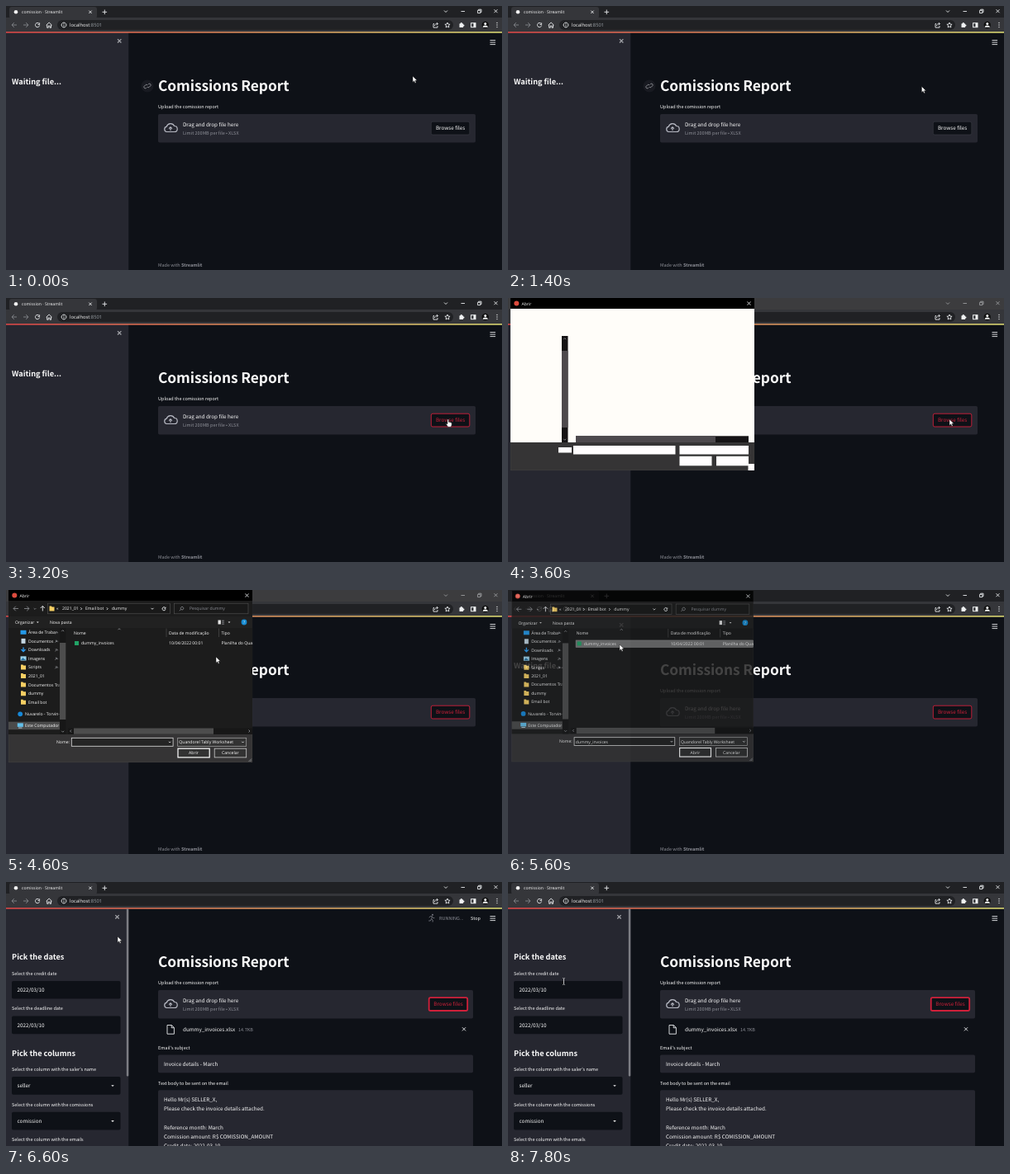
Animation of 600x320 px, one loop 8000 ms. Source, as an HTML page:

```html
<!DOCTYPE html>
<html lang="en">
<head>
<meta charset="utf-8">
<title>Comissions Report</title>
<style>
  html, body { margin: 0; width: 100%; height: 100%; overflow: hidden; background: #0e1117; }
  svg { display: block; width: 100vw; height: 100vh; }
  text { white-space: pre; text-rendering: geometricPrecision; fill: #fafafa;
    font: 6.33px "Noto Sans CJK JP", "Noto Sans CJK SC", "Noto Sans", sans-serif; }
  text.small { font-size: 5.52px; }
  text.dim { fill: #8d8f97; }
  text.head { font-size: 9.2px; font-weight: 700; }
  text.title { font-size: 17.35px; font-weight: 700; letter-spacing: -.08px; }
  text.ui { font: 5.1px "Open Sans", "Noto Sans", sans-serif; }
  text.mid { text-anchor: middle; }
  .line { fill: none; stroke: #e8eaed; stroke-width: .9; }
  .gray { stroke: #85878c; }
</style>
</head>
<body>
<svg id="stage" viewBox="0 0 600 320"></svg>
<script>
const text = (x, y, s, cls = '') => `<text x="${x}" y="${y}" class="${cls}">${s}</text>`;
const ui = (x, y, s, cls = '') => text(x, y, s, 'ui ' + cls);
const rect = (x, y, w, h, fill, more = '') =>
  `<rect x="${x}" y="${y}" width="${w}" height="${h}" fill="${fill}" ${more}/>`;
const dot = (x, y, r, fill) => `<circle cx="${x}" cy="${y}" r="${r}" fill="${fill}"/>`;
const line = (d, cls = '', more = '') => `<path class="line ${cls}" d="${d}" ${more}/>`;
const group = (id, ...parts) => `<g id="${id}">${parts.join('')}</g>`;
const cross = (x, y, r, cls, more) =>
  line(`M${x - r} ${y - r}l${2 * r} ${2 * r}m0 ${-2 * r}l${-2 * r} ${2 * r}`, cls, more);
const chevron = (x, y, r = 1.5, cls = '') => line(`M${x - r} ${y - r / 2}l${r} ${r}l${r} ${-r}`, cls);
const chevronUp = (x, y) => line(`M${x - 1.5} ${y + .7}l1.5 -1.5l1.5 1.5`, 'gray');
const chevronRight = (x, y) => line(`M${x - .7} ${y - 1.4}l1.4 1.4l-1.4 1.4`, '', 'stroke-width=".6"');
const triangle = (x, y, r = 1.8) => `<path d="M${x - r} ${y - r / 2}h${2 * r}l${-r} ${r}z" fill="#fafafa"/>`;
const arrowLeft = (x, y, cls) => line(`M${x + 3} ${y}h-6m2.8 -2.8l-2.8 2.8l2.8 2.8`, cls);
const arrowRight = (x, y, cls) => line(`M${x - 3} ${y}h6m-2.8 -2.8l2.8 2.8l-2.8 2.8`, cls);
const reload = (x, y, r) =>
  line(`M${x + r * .8} ${y - r * .6}A${r} ${r} 0 1 0 ${x + r} ${y + .5}M${x + r} ${y - r}v${r * .8}h${-r * .8}`);
const folder = (x, y) =>
  `<path d="M${x - 3} ${y - 3}h2.4l.8 1h2.8v5h-6z" fill="#f6cf63"/>`;
const square = (x, y, size, fill) => rect(x - size / 2, y - size / 2, size, size, fill);

const browser = [
  rect(0, 0, 600, 14, '#202124', 'id="strip"'),
  rect(4, 1, 106, 14, '#35363a', 'rx="3"'),
  rect(0, 14, 600, 18, '#35363a'),
  dot(12, 7.3, 2.3, '#f4f4f4'),
  ui(19, 9.3, 'comission · Streamlit'),
  cross(102, 7.3, 1.7),
  line('M116.5 7.3h5.6M119.3 4.5v5.6'),
  group('controls',
    chevron(532, 6.5, 2), line('M550.5 6.5h4.5'),
    line('M570.6 5.3h3.3v3.3h-3.3zM571.7 5.3v-1.1h3.3v3.3h-1.1', '', 'stroke-width=".7"'),
    cross(592.5, 6.2, 2)),
  arrowLeft(10, 23, 'gray'), arrowRight(24, 23, 'gray'), reload(38, 23, 2.6),
  line('M48.7 23.2l3.4 -3.2l3.4 3.2M49.7 22.7v3.6h1.5v-2.2h1.8v2.2h1.5v-3.6'),
  rect(62, 17, 479, 12, '#202124', 'rx="6"'),
  line('M70 20.1a2.9 2.9 0 1 0 .01 0M70 22.5v2M70 21.3v.7', '', 'stroke-width=".7"'),
  `<text x="77" y="25.1" class="ui" style="font-size:5.8px">localhost<tspan fill="#9aa0a6">:8501</tspan></text>`,
  line('M518 21.5h-1v4.6h5v-2M518.5 24c0 -2 1.5 -2.4 3.8 -2.4m-1.4 -1.6l1.6 1.6l-1.6 1.6', '', 'stroke-width=".7"'),
  line('M534 20l.9 2.1l2.2 .2l-1.7 1.5l.5 2.2l-1.9 -1.2l-1.9 1.2l.5 -2.2l-1.7 -1.5l2.2 -.2z', '', 'stroke-width=".7"'),
  rect(548.5, 21.3, 4.6, 4.6, '#f1f3f4', 'rx=".5"'), dot(550.8, 21, 1.1, '#f1f3f4'), dot(553.4, 23.6, 1.1, '#f1f3f4'),
  rect(562.6, 20.7, 5.4, 5, 'none', 'stroke="#f1f3f4"'), rect(565.5, 20.7, 2.5, 5, '#f1f3f4'),
  dot(579.8, 23, 4.2, '#111'), dot(579.8, 21.6, 1.5, '#f1f3f4'),
  '<path d="M576.8 25.8a3 2.4 0 0 1 6 0z" fill="#f1f3f4"/>',
  [20.4, 23, 25.6].map(y => dot(594, y, .7, '#f1f3f4')).join('')
];

const page = [
  rect(0, 32, 600, 288, '#0e1117'),
  rect(0, 32, 148.3, 288, '#262730'),
  rect(0, 31.3, 600, 1.3, 'url(#rainbow)'),
  line('M585.5 41.6h6.6m-6.6 2.5h6.6m-6.6 2.5h6.6'),
  group('closeSide', cross(137.2, 42.3, 2.2, '', 'style="stroke:#a5a6ab;stroke-width:1.2"')),
  group('link', dot(171, 97, 7.5, '#181a21'),
    line('M170.3 98.6l-1 1a1.6 1.6 0 0 1 -2.2 -2.2l1.6 -1.6a1.6 1.6 0 0 1 2.2 0M171.7 95.4l1 -1a1.6 1.6 0 0 1 2.2 2.2l-1.6 1.6a1.6 1.6 0 0 1 -2.2 0', '', 'style="stroke:#a5a6ab;stroke-width:.8"')),
  text(184, 103, 'Comissions Report', 'title'),
  text(184, 124, 'Upload the comission report', 'small'),
  rect(184, 131, 384, 34.5, '#262730', 'rx="1.8" id="drop"'),
  line('M194.5 152.5a3.2 3.2 0 0 1 -.2 -6.3a5 5 0 0 1 9.3 -.7a3.5 3.5 0 0 1 .2 7z', '', 'style="stroke:#b8bac4;stroke-width:1.2"'),
  line('M199 151v-4.2m-1.9 1.8l1.9 -1.9l1.9 1.9', '', 'style="stroke:#b8bac4;stroke-width:1.1"'),
  text(214, 145.8, 'Drag and drop file here'),
  text(214, 156.4, 'Limit 200MB per file • XLSX', 'small dim'),
  group('button', rect(514.3, 140.2, 46.5, 15.8, '#0e1117', 'rx="1.8" id="face"'),
    `<text x="537.6" y="150.2" class="mid" id="caption">Browse files</text>`)
];

const footer = `<text x="184" y="315.5" class="small dim">Made with <tspan font-weight="700">Streamlit</tspan></text>`;

const fileRow = [
  line('M195 173.5h5.4l3 3v7.7h-8.4zM200.2 173.6v3.1h3', '', 'stroke-width=".8"'),
  text(214, 180.8, 'dummy_invoices.xlsx'),
  text(281, 180.8, '14.7KB', 'small dim'),
  cross(554, 178.3, 2.1)
];

const sideField = (label, value, y, arrow) =>
  text(7, y, label, 'small') + rect(7, y + 7.3, 131.5, 21.7, '#0e1117', 'rx="1.8"') +
  text(13.5, y + 20.4, value) + (arrow ? triangle(129, y + 18.5) : '');

const form = [
  text(7, 94.4, 'Pick the dates', 'head'),
  sideField('Select the credit date', '2022/03/10', 112.6),
  sideField('Select the deadline date', '2022/03/10', 155.3),
  text(7, 210.6, 'Pick the columns', 'head'),
  sideField("Select the column with the saler's name", 'seller', 228.7, true),
  sideField('Select the column with the comissions', 'comission', 271.5, true),
  text(7, 314.4, 'Select the column with the emails', 'small'),
  rect(145.8, 32.5, 2.5, 203, '#7c7d83', 'rx="1"'),
  text(184, 203.2, "Email's subject", 'small'),
  rect(184, 209.5, 381, 21.8, '#262730', 'rx="1.8"'),
  text(191, 222.6, 'Invoice details - March'),
  text(184, 246.1, 'Text body to be sent on the email', 'small'),
  rect(184, 252.3, 381, 70, '#262730', 'rx="1.8"'),
  ['Hello Mr(s) SELLER_X,', 'Please check the invoice details attached.', '',
   'Reference month: March', 'Comission amount: R$ COMISSION_AMOUNT', 'Credit date: 2022-03-10']
    .map((s, i) => text(191, 265.6 + i * 11.3, s)).join('')
];

const running = [
  dot(516, 39.7, 1, '#777982'),
  line('M511.8 43.2l1.5 -1.7l2.3 .3l-1 3l1.6 1.3v2.4M514.3 45.2l-1 1.8h-2M515.6 42.2l1.2 1.4h1.5', '', 'style="stroke:#777982"'),
  text(524, 46, 'RUNNING...', 'small dim'),
  text(562, 46, 'Stop', 'small')
];

const treeItems = ['Área de Traba', 'Documentos', 'Downloads', 'Imagens', 'Scripts',
  '2021_01', 'Documentos Tra', 'dummy', 'Email bot'];
const tree = treeItems.map((name, i) => {
  const y = 51.3 + i * 10.55;
  const icon = [
    rect(17.5, y - 2.5, 7, 5, '#2499e8'),
    rect(18.5, y - 3, 5, 6, '#c3d6e2'),
    line(`M21 ${y - 3}v5m-2.5 -2.4l2.5 2.5l2.5 -2.5`, '', 'style="stroke:#2a9df4;stroke-width:1.3"'),
    rect(17.5, y - 2.6, 7, 5.2, '#9ed4ed') + `<path d="M18 ${y + 2}l2.3 -3l3.7 3z" fill="#2872a0"/>`
  ][i] || folder(21, y);
  const pin = i < 5 ? line(`M59.4 ${y + 1.8}l1.6 -1.6m-1 -1l2 2m-1.2 -2.5l2 2`, 'gray') : '';
  return icon + ui(27, y + 1.9, name) + pin;
}).join('');

const skeleton = [
  rect(3, 13, 295, 162, '#fffdf9'),
  rect(65, 46, 7.5, 129, '#151315'), rect(65, 64, 7.5, 93, '#4d494d'),
  chevronUp(68.7, 49.5), chevron(68.7, 171.5, 1.5, 'gray'),
  rect(82, 167.3, 209, 7.7, '#151315'), rect(82, 167.3, 169, 7.7, '#4d494d'),
  [[61, 181, 16, 6.5], [79, 179, 123.5, 10.5], [207.5, 179, 83.5, 10.5],
   [207.5, 191.8, 39, 11.5], [252, 191.8, 39, 11.5], [290.5, 201, 7.5, 8]]
    .map(box => rect(...box, '#fffdfe')).join('')
];

const listing = [
  rect(3, 13, 295, 162, '#1c1c1c'),
  rect(3, 32, 295, 14, '#212121'),
  arrowLeft(12, 22.5, 'gray'), arrowRight(25, 22.5, 'gray'), chevron(35, 22.8, 1.3, 'gray'),
  line('M44.3 25.5v-6m-2.6 2.5l2.6 -2.6l2.6 2.6', '', 'stroke-width="1.1"'),
  rect(50.3, 16.2, 148, 12.6, '#191919', 'stroke="#555" stroke-width=".6"'),
  folder(55.5, 22.6), ui(61, 24.2, '«'), ui(68, 24.4, '2021_01'), chevronRight(91, 22.7),
  ui(96, 24.4, 'Email bot'), chevronRight(122.5, 22.7), ui(128, 24.4, 'dummy'),
  chevron(177, 22.6), reload(191, 22.7, 2),
  rect(203.5, 16.2, 89.5, 12.6, '#191919', 'stroke="#555" stroke-width=".6"'),
  line('M213 20.4a1.8 1.8 0 1 1 -.01 0M211.6 23.4l-1.8 1.8', 'gray'),
  ui(222, 24.4, 'Pesquisar dummy', 'dim'),
  ui(11, 40.9, 'Organizar'), triangle(38.3, 39.2, 1.4), ui(53, 40.9, 'Nova pasta'),
  rect(256.5, 36.5, 3.4, 5, '#e5e5e5'), line('M261 37.2h3m-3 2h3m-3 2h3', 'gray'), triangle(270, 39.2, 1.4),
  dot(288, 39, 3.4, '#168bd2'), ui(288, 41, '?', 'mid'),
  rect(3, 159.7, 62, 9.5, '#4b4b4b'),
  `<g clip-path="url(#treeClip)">${tree}`,
  dot(17.2, 150.3, 2.9, '#1688d8'), ui(23, 152.2, 'Nuvarelo - Torvin-Co'),
  rect(13.8, 161.4, 7, 4.5, '#62bfe9'), rect(15, 166.6, 4.5, .9, '#b8d8e8'), ui(23, 166.3, 'Este Computador'), '</g>',
  rect(65, 46, 7.3, 129, '#171717'), rect(65, 64, 7.3, 93, '#4d4d4d'),
  chevronUp(68.7, 49.5), chevron(68.7, 171.5, 1.5, 'gray'),
  ui(82, 53.5, 'Nome'), chevronUp(137, 47.5), ui(197, 53.5, 'Data de modificação'), ui(260.5, 53.5, 'Tipo'),
  line('M194 46.5v10.5M257.5 46.5v10.5', '', 'style="stroke:#555;stroke-width:.6"'),
  rect(81.3, 60.5, 216.5, 8.6, '#737373', 'id="picked" stroke="#999" stroke-width=".5"'),
  square(85.5, 64.5, 5, '#21a366'), ui(91, 66.4, 'dummy_invoices'), ui(197, 66.4, '10/04/2022 00:01'),
  ui(260.5, 66.4, 'Planilha do Quan'),
  rect(75, 167.5, 223, 7.2, '#171717'), rect(82, 167.5, 169, 7.2, '#4d4d4d'),
  line('M79 169.5l-1.5 1.5l1.5 1.5M293.5 169.5l1.5 1.5l-1.5 1.5', 'gray'),
  ui(61, 186, 'Nome:'),
  rect(79.3, 179.3, 122.8, 10, '#252525', 'stroke="#ddd" stroke-width=".8"'), chevron(198.2, 184.4, 1.2),
  `<g id="filename">${ui(81, 186.2, 'dummy_invoices')}</g>`,
  rect(207.7, 179.3, 83, 10, '#333', 'stroke="#aaa" stroke-width=".7"'),
  ui(209.3, 186.2, 'Quandorel Tably Worksheet'), chevron(286.5, 184.4, 1.2),
  rect(208, 192.2, 38.2, 10.7, '#333', 'stroke="#fff" stroke-width="1.2"'), ui(227, 199.4, 'Abrir', 'mid'),
  rect(252.2, 192.2, 38.5, 10.7, '#333', 'stroke="#ccc" stroke-width=".8"'), ui(271.3, 199.4, 'Cancelar', 'mid'),
  line('M293.5 208l3.5 -3.5m-1.7 3.5l1.7 -1.7', 'gray')
];

const dialog = [
  rect(3, 0, 295, 209, '#353435', 'stroke="#4a4a4a" stroke-width=".5"'),
  rect(3, 0, 295, 13.5, '#000'),
  dot(10.3, 6.6, 3, '#dd4b3e'), ui(16.5, 8.7, 'Abrir'), cross(291.5, 6.5, 2),
  group('skeleton', ...skeleton), group('listing', ...listing)
];

const outline = 'fill="#fff" stroke="#111" stroke-width=".45" stroke-linejoin="round"';
const cursors = [
  `<path id="arrow" d="M0 0V7.4L1.7 5.8L2.9 8.4L4.1 7.8L3 5.3H5.3Z" ${outline}/>`,
  `<path id="hand" d="M0 .7a.8 .8 0 0 1 1.6 0V3.5l.3 -.3l1.2 .3l1.2 .4l.9 .6v2.4l-.9 2.3h-3.6l-2.4 -3.4q0 -1.2 1.7 .1z" ${outline}/>`,
  line('M-1.4 -1.5q1.4 0 1.4 1v6q0 1 -1.4 1M1.4 -1.5q-1.4 0 -1.4 1v6q0 1 1.4 1', '', 'id="beam" style="stroke:#d0d0d0;stroke-width:.7"')
];

const stage = document.getElementById('stage');
stage.innerHTML = `<defs>
  <linearGradient id="rainbow"><stop stop-color="#ff4b4b"/><stop offset="1" stop-color="#fffd80"/></linearGradient>
  <clipPath id="treeClip"><rect x="3" y="46" width="61.5" height="122"/></clipPath>
  <clipPath id="dialogClip"><rect x="2.7" y="0" width="295.5" height="209.3"/></clipPath></defs>` +
  browser.join('') + page.join('') +
  group('waiting', text(7, 94.5, 'Waiting file...', 'head')) + group('footer', footer) +
  group('fileRow', ...fileRow) + group('form', ...form) + group('running', ...running) +
  `<g id="dialog" clip-path="url(#dialogClip)">${dialog.join('')}</g>` + group('cursor', ...cursors);

const el = id => document.getElementById(id);
const show = (id, on) => el(id).style.display = on ? '' : 'none';
const set = (id, attrs) => Object.entries(attrs).forEach(([k, v]) => el(id).setAttribute(k, v));

const track = [[0, 492, 85], [1200, 492, 85], [2200, 534, 147], [3800, 534, 147],
  [4600, 254, 81], [5200, 135, 66], [7200, 135, 66], [7800, 67.5, 118]];

function cursorAt(t) {
  const i = Math.max(1, track.findIndex(key => key[0] >= t));
  const [t0, x0, y0] = track[i - 1], [t1, x1, y1] = track[i];
  const k = (t - t0) / (t1 - t0);
  return [x0 + (x1 - x0) * k, y0 + (y1 - y0) * k];
}

function buttonLook(t) {
  if (t < 2000) return ['#0e1117', '#3b3d46', .6, '#fafafa'];
  if (t === 2400) return ['#ee1f39', '#f0455a', 1.8, '#fff'];
  return ['#0e1117', '#d0203a', t < 5800 ? .9 : 1.8, '#d0203a'];
}

function draw(t) {
  const filled = t >= 6400;
  const open = t >= 3400 && t < 5800;
  const closing = t >= 5600;
  const inactive = open && !closing;
  set('strip', { fill: inactive ? '#3c3c3e' : '#202124' });
  set('controls', { opacity: inactive ? .55 : 1 });

  const [face, edge, weight, ink] = buttonLook(t);
  set('face', { fill: face, stroke: edge, 'stroke-width': weight });
  el('caption').style.fill = ink;
  set('button', { transform: `translate(${filled ? -2.6 : 0})` });
  set('closeSide', { transform: `translate(${filled ? -2.7 : 0})` });
  set('drop', { width: filled ? 381 : 384 });

  show('link', t < 1600);
  show('waiting', !filled);
  show('footer', !filled);
  show('fileRow', t >= 6000);
  show('form', filled);
  show('running', t >= 6000 && t < 7000);

  show('dialog', open);
  show('skeleton', t < 3800);
  show('listing', t >= 3800);
  show('picked', t >= 5200);
  show('filename', t >= 5200);
  set('dialog', closing
    ? { opacity: .82, transform: 'translate(1.5 1) scale(.991)' }
    : { opacity: 1, transform: '' });

  const [x, y] = cursorAt(t);
  const hand = t >= 2000 && t < 3400, beam = t >= 7600;
  set('cursor', { transform: `translate(${x} ${y})` });
  show('hand', hand);
  show('beam', beam);
  show('arrow', !hand && !beam);
}

function tick() {
  draw(Math.floor(performance.now() % 8000 / 200) * 200);
  requestAnimationFrame(tick);
}
tick();
</script>
</body>
</html>
```
